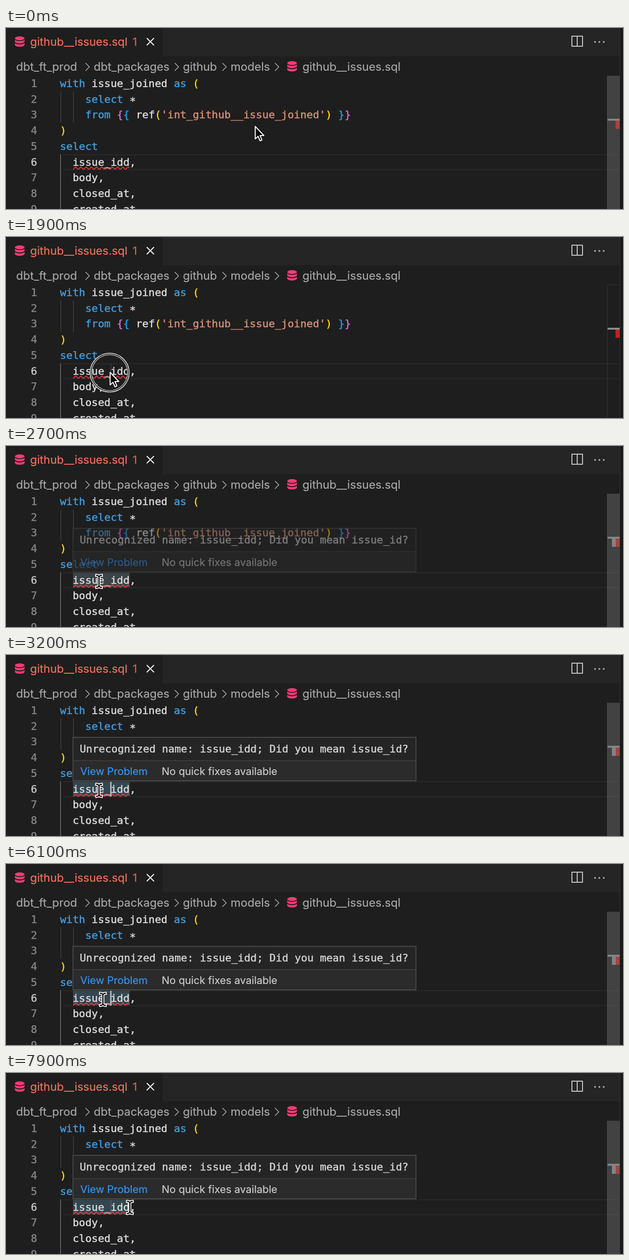
Write an HTML page with a canvas that moves like this. It is 1280 by 377 pixels and loops after 8 s.

```html
<!DOCTYPE html>
<html lang="en">
<head>
<meta charset="utf-8">
<title>Editor hover</title>
<style>
  html, body { margin: 0; width: 100%; height: 100%; overflow: hidden; background: #1e1e1e; }
  canvas { display: block; }
</style>
</head>
<body>
<canvas id="stage" width="1280" height="377"></canvas>
<script>
const ctx = document.getElementById('stage').getContext('2d');
const LOOP = 8000, ROW = 32.7, COL = 13.12, LEFT = 112, BASE = 123;
const MONO = '21.79px "DejaVu Sans Mono", monospace';
const UI = '23.5px Inter, sans-serif';
const UI_PATH = '23.7px Inter, sans-serif';
const UI_SMALL = '21.5px Inter, sans-serif';
const WHITE = '#dcdcdc', BLUE = '#439cdc', GOLD = '#ffd700', PINK = '#da70d6',
      SKY = '#179fff', STRING = '#d88f76', GRAY = '#a9a9a9', DB = '#ff3b76';

// Each line: indent, then text and colour pairs.
const code = [
  [0, 'with', BLUE, ' issue_joined ', WHITE, 'as', BLUE, ' (', GOLD],
  [4, 'select', BLUE],
  [4, 'from ', BLUE, '{', PINK, '{', SKY, ' ref', WHITE, '(', GOLD,
    "'int_github__issue_joined'", STRING, ') ', GOLD, '}', SKY, '}', PINK],
  [0, ')', GOLD],
  [0, 'select', BLUE],
  [2, 'issue_idd,', WHITE],
  [2, 'body,', WHITE],
  [2, 'closed_at,', WHITE],
  [2, 'created_at,', WHITE]
];

const clamp = v => Math.max(0, Math.min(1, v));
const ramp = (t, a, b) => clamp((t - a) / (b - a));

function rect(x, y, w, h, color) {
  ctx.fillStyle = color;
  ctx.fillRect(x, y, w, h);
}

// A thin outline gives the heavier look of the editor's text.
function text(str, x, y, color, font) {
  ctx.font = font;
  ctx.fillStyle = ctx.strokeStyle = color;
  ctx.lineWidth = font === MONO ? .5 : .2;
  ctx.fillText(str, x, y);
  ctx.strokeText(str, x, y);
}

function stroke(points, color, width) {
  ctx.beginPath();
  points.forEach(([x, y]) => ctx.lineTo(x, y));
  ctx.strokeStyle = color;
  ctx.lineWidth = width;
  ctx.stroke();
}

function ring(x, y, r, color, width) {
  ctx.beginPath();
  ctx.arc(x, y, r, 0, Math.PI * 2);
  ctx.strokeStyle = color;
  ctx.lineWidth = width;
  ctx.stroke();
}

function withAlpha(alpha, paint) {
  if (alpha <= 0) return;
  ctx.save();
  ctx.globalAlpha = alpha;
  paint();
  ctx.restore();
}

function database(x, y) {
  ctx.fillStyle = DB;
  ctx.beginPath();
  ctx.ellipse(x, y + 4, 10, 4, 0, 0, Math.PI * 2);
  ctx.fill();
  for (const top of [y + 6.5, y + 13.5]) {
    ctx.beginPath();
    ctx.moveTo(x - 10, top);
    ctx.bezierCurveTo(x - 8, top + 4.4, x + 8, top + 4.4, x + 10, top);
    ctx.lineTo(x + 10, top + 4.5);
    ctx.bezierCurveTo(x + 8, top + 9.2, x - 8, top + 9.2, x - 10, top + 4.5);
    ctx.fill();
  }
}

function header() {
  rect(325, 0, 949, 59, '#252526');
  database(28.5, 17.5);
  text('github__issues.sql', 50, 37, '#f8705d', UI);
  text('1', 262.5, 37, '#d9604f', UI);
  stroke([[292, 21], [307, 36]], '#fff', 2);
  stroke([[307, 21], [292, 36]], '#fff', 2);
  ctx.lineWidth = 2;
  ctx.strokeStyle = '#c5c5c5';
  ctx.strokeRect(1174, 17, 22, 21);
  stroke([[1185, 17], [1185, 38]], '#c5c5c5', 2);
  for (const x of [1222, 1231, 1240]) rect(x - 1.5, 27.5, 3, 3, '#c5c5c5');

  [['dbt_ft_prod', 21], ['dbt_packages', 182], ['github', 367], ['models', 466], ['github__issues.sql', 615]]
    .forEach(([name, x]) => text(name, x, 89, GRAY, UI_PATH));
  for (const x of [165, 350, 449, 558]) stroke([[x, 73], [x + 8, 81], [x, 89]], GRAY, 1.7);
  database(593.5, 69);
}

function editor(t) {
  for (const x of [113, 139]) rect(x, 132, 1.5, 65, '#404040');
  rect(112.5, 263, 1.5, 114, '#707070');
  rect(118, 263, 1154, 2, '#292929');
  rect(118, 294, 1154, 2, '#292929');

  if (t >= 2150) rect(139, 264, 117.5, 30, 'rgba(87,87,87,.6)');
  withAlpha(hoverAlpha(t) * .45, () => rect(139, 264, 117.5, 30, '#265064'));

  const wave = [];
  for (let x = 139; x <= 256; x++)
    wave.push([x, 292 + 2.2 * Math.cos((x - 139) * Math.PI * 2 / 10.9)]);
  stroke(wave, '#ee3a3f', 1.8);

  code.forEach(([indent, ...tokens], i) => {
    const y = BASE + i * ROW;
    text(i + 1, 51.5, y, i === 5 ? '#c6c6c6' : '#858585', MONO);
    let col = indent;
    for (let k = 0; k < tokens.length; k += 2) {
      text(tokens[k], LEFT + col * COL, y, tokens[k + 1], MONO);
      col += tokens[k].length;
    }
  });
  text('*', LEFT + 11 * COL, BASE + ROW + 4, WHITE, MONO);
}

function scrollbar(t) {
  rect(1247, 100, 1, 277, '#333');
  rect(1247, 99, 26, 1, '#333');
  rect(1248, 189, 25, 4, '#8d8d8d');
  rect(1264.5, 193, 8.5, 17, '#bd2222');
  if (t >= 2150) rect(1257, 193, 8, 17, '#8a8a8a');
  withAlpha(1 - ramp(t, 100, 600) + ramp(t, 1980, 2100),
    () => rect(1247, 100, 27, 277, 'rgba(121,121,121,.4)'));
  rect(1274, 0, 6, 377, '#191919');
  rect(1273, 0, 1.2, 377, '#353535');
}

const hoverAlpha = t => ramp(t, 2620, 2800);

function tooltip() {
  rect(138, 171, 713, 92, '#252526');
  rect(139, 220, 711, 42, '#2b2b2c');
  ctx.strokeStyle = '#4a4a4a';
  ctx.lineWidth = 1.8;
  ctx.strokeRect(139, 171.5, 711.5, 90.5);
  rect(139, 219.2, 711, 1.6, '#404040');
  text('Unrecognized name: issue_idd; Did you mean issue_id?', 153, 203, '#d4d4d4', MONO);
  text('View Problem', 154, 249.5, '#3297f8', UI_SMALL);
  text('No quick fixes available', 323, 249.5, '#cecece', UI_SMALL);
}

function caretAlpha(t) {
  if (t < 1900) return 0;
  const phase = (t - 1880) % 1000;
  return ramp(phase, 0, 200) - ramp(phase, 540, 740);
}

// Pointer stops: time, x, y, and the easing of the way there.
const smooth = p => p * p * (3 - 2 * p), steady = p => p;
const easeIn = p => Math.pow(p, 1.4), easeOut = p => 1 - (1 - p) * (1 - p);
const stops = [
  [50, 517, 205], [700, 257, 260, easeIn], [1200, 216, 282, easeOut],
  [1950, 216, 282, steady], [2400, 193, 282, smooth], [5350, 193, 282, steady],
  [6100, 201, 282, easeIn], [7000, 257, 280, smooth]
];

function pointerAt(t) {
  const next = stops.findIndex(s => s[0] > t);
  if (next === 0) return stops[0].slice(1);
  if (next < 0) return stops[stops.length - 1].slice(1);
  const [t0, x0, y0] = stops[next - 1], [t1, x1, y1, ease] = stops[next];
  const p = ease((t - t0) / (t1 - t0));
  return [x0 + (x1 - x0) * p, y0 + (y1 - y0) * p];
}

function arrow() {
  ctx.beginPath();
  [[0, 0], [0, 26], [6, 20.5], [10, 30], [14, 28.3], [10, 19], [18, 19]]
    .forEach(([x, y]) => ctx.lineTo(x, y));
  ctx.closePath();
  ctx.fillStyle = '#000';
  ctx.fill();
  ctx.strokeStyle = '#fff';
  ctx.lineWidth = 2;
  ctx.stroke();
}

function beam() {
  ctx.lineCap = 'square';
  for (const [color, width] of [['#fff', 6], ['#111', 2.4]])
    for (const side of [-5, 5])
      stroke([[side, -12.5], [side * .4, -12], [0, -9.5], [0, 9.5], [side * .4, 12], [side, 12.5]], color, width);
}

function pointer(t) {
  const [x, y] = pointerAt(t);
  if (t >= 1860 && t < 2050) {
    ring(215, 282.5, 39, '#222', 3);
    ring(215, 282.5, 40.5, '#e4e4e4', 1.5);
    ring(215, 282.5, 37.3, '#d0d0d0', 1.3);
  }
  ctx.save();
  ctx.translate(x, y);
  if (t < 2100) arrow(); else beam();
  ctx.restore();
}

function draw(t) {
  rect(0, 0, 1280, 377, '#1e1e1e');
  header();
  editor(t);
  scrollbar(t);
  withAlpha(hoverAlpha(t), tooltip);
  withAlpha(caretAlpha(t), () => rect(216, 264, 3, 31, '#b4b4b4'));
  pointer(t);
}

ctx.lineJoin = 'round';
const start = performance.now();
function tick() {
  draw((performance.now() - start) % LOOP);
  requestAnimationFrame(tick);
}
tick();
</script>
</body>
</html>
```
